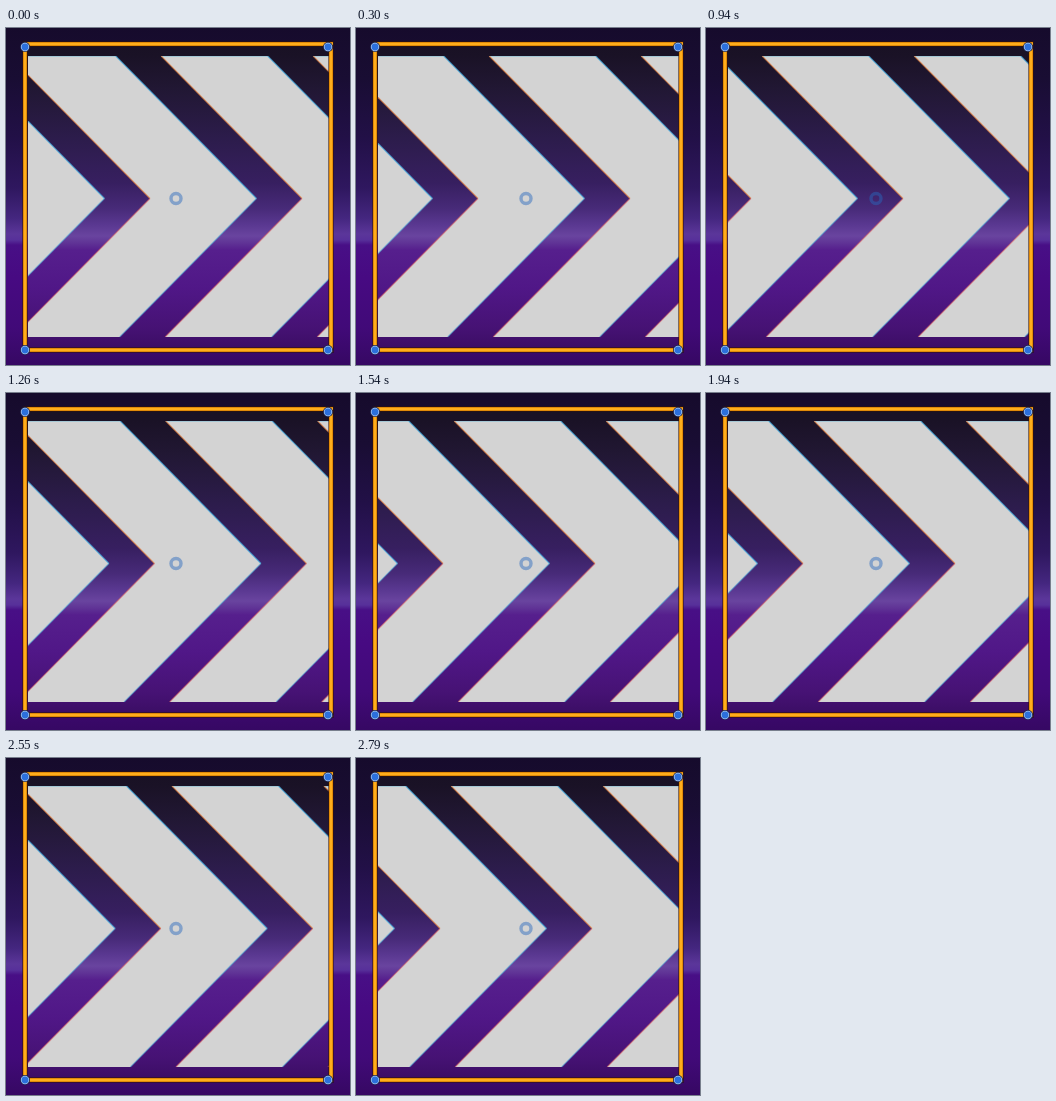
These frames come from a looping animation (344 by 337 pixels, 2.83 s). An HTML page with a canvas:

```html
<!DOCTYPE html>
<html lang="en">
<head>
<meta charset="utf-8">
<title>Scrolling chevrons</title>
<style>
html, body { margin: 0; width: 100%; height: 100%; overflow: hidden; background: #160b2c; }
canvas { display: block; }
</style>
</head>
<body>
<canvas id="stage" width="344" height="337"></canvas>
<script>
const ctx = document.getElementById('stage').getContext('2d');
const W = 344, H = 337, LOOP = 2830;
const PERIOD = 152, BODY = 106.5, MID = 170.5;
const PANEL = { l: 22, t: 28, r: 323, b: 309 };

// Runs of picture changes: first time, last time, count
const runs = [[30, 540, 14], [580, 1100, 14], [1140, 1660, 14], [1700, 2190, 13], [2230, 2750, 14]];
const ticks = [0];
for (const [a, b, n] of runs) {
  for (let i = 0; i < n; i++) ticks.push(Math.floor((a + i * (b - a) / (n - 1)) / 10) * 10);
}
ticks.push(2790);

// Time and unwrapped x of one notch tip
const path = [[0, 144], [300, 274], [940, 501], [1540, 695], [1940, 857], [2310, 985.5], [2790, 1148]];

function notchAt(t) {
  let i = 1;
  while (i < path.length - 1 && t > path[i][0]) i++;
  const [t0, x0] = path[i - 1], [t1, x1] = path[i];
  return x0 + (x1 - x0) * (t - t0) / (t1 - t0);
}

function gradient(stops) {
  const g = ctx.createLinearGradient(0, 0, 0, H);
  for (const [y, color] of stops) g.addColorStop(y / H, color);
  return g;
}

const sky = gradient([
  [0, '#160b2c'], [50, '#190d33'], [110, '#221047'], [160, '#2f175f'], [190, '#44267f'],
  [206, '#5b369a'], [212, '#57309a'], [217, '#480f86'], [250, '#470a82'], [300, '#410a78'], [337, '#360863']
]);
const glass = gradient([
  [0, '#171021'], [28, '#1a1226'], [60, '#211733'], [110, '#2c1c4b'], [155, '#371f60'],
  [180, '#472a78'], [197, '#5a3891'], [208, '#69449f'], [214, '#613697'], [222, '#561f8d'],
  [260, '#501787'], [300, '#461274'], [322, '#3a0d63']
]);

// Half outline of one edge; dir -1 is the upper half, 1 the lower
function edge(x, dir) {
  const y = dir < 0 ? PANEL.t : PANEL.b;
  ctx.moveTo(x - Math.abs(y - MID) * 0.988, y);
  ctx.lineTo(x, MID);
}

function strokeEdge(x, dir, color) {
  ctx.beginPath();
  edge(x, dir);
  ctx.strokeStyle = color;
  ctx.lineWidth = 1.2;
  ctx.stroke();
}

function chevron(x) {
  const up = (MID - PANEL.t) * 0.988, down = (PANEL.b - MID) * 0.988, tip = x + BODY;
  ctx.beginPath();
  ctx.moveTo(x - up, PANEL.t);
  ctx.lineTo(tip - up, PANEL.t);
  ctx.lineTo(tip, MID);
  ctx.lineTo(tip - down, PANEL.b);
  ctx.lineTo(x - down, PANEL.b);
  ctx.lineTo(x, MID);
  ctx.closePath();
  ctx.fillStyle = '#d3d3d3';
  ctx.fill();
  ctx.fillStyle = 'rgba(120,190,215,.5)';
  ctx.fillRect(x - up, PANEL.t, BODY, 1);
  strokeEdge(tip, -1, 'rgba(60,170,225,.7)');
  strokeEdge(tip, 1, 'rgba(70,165,215,.55)');
  strokeEdge(x, -1, 'rgba(235,130,60,.65)');
  strokeEdge(x, 1, 'rgba(225,95,95,.55)');
}

function bar(x, y, w, h) {
  ctx.fillStyle = 'rgba(50,20,10,.55)';
  ctx.fillRect(x - 1, y - 1, w + 2, h + 2);
  ctx.fillStyle = '#e18a08';
  ctx.fillRect(x, y, w, h);
  ctx.fillStyle = '#ffae1c';
  if (w > h) ctx.fillRect(x, y + 1, w, h - 2);
  else ctx.fillRect(x + 1, y, w - 2, h);
}

function disc(x, y, r, color) {
  ctx.beginPath();
  ctx.arc(x, y, r, 0, Math.PI * 2);
  ctx.fillStyle = color;
  ctx.fill();
}

function handle(x, y) {
  disc(x, y, 5, '#1b2450');
  disc(x, y, 4.2, '#a9c9f2');
  disc(x, y, 3.4, '#2c70dc');
}

function draw(t) {
  ctx.fillStyle = sky;
  ctx.fillRect(0, 0, W, H);
  ctx.fillStyle = glass;
  ctx.fillRect(19, 16, 306, 306);

  ctx.save();
  ctx.beginPath();
  ctx.rect(PANEL.l, PANEL.t, PANEL.r - PANEL.l, PANEL.b - PANEL.t);
  ctx.clip();
  const first = notchAt(t) % PERIOD - PERIOD;
  for (let x = first; x < W + PERIOD; x += PERIOD) chevron(x);
  ctx.restore();

  bar(18, 14, 309, 4);
  bar(18, 320, 309, 4);
  bar(17, 18, 4, 303);
  bar(323, 18, 4, 303);
  for (const x of [19, 322]) for (const y of [19, 322]) handle(x, y);

  ctx.beginPath();
  ctx.arc(170, 170.5, 5, 0, Math.PI * 2);
  ctx.strokeStyle = 'rgba(40,105,190,.47)';
  ctx.lineWidth = 3.4;
  ctx.stroke();
}

const start = performance.now();
function frame() {
  const t = (performance.now() - start) % LOOP;
  let i = ticks.length - 1;
  while (i > 0 && ticks[i] > t) i--;
  draw(ticks[i]);
  requestAnimationFrame(frame);
}
frame();
</script>
</body>
</html>
```
